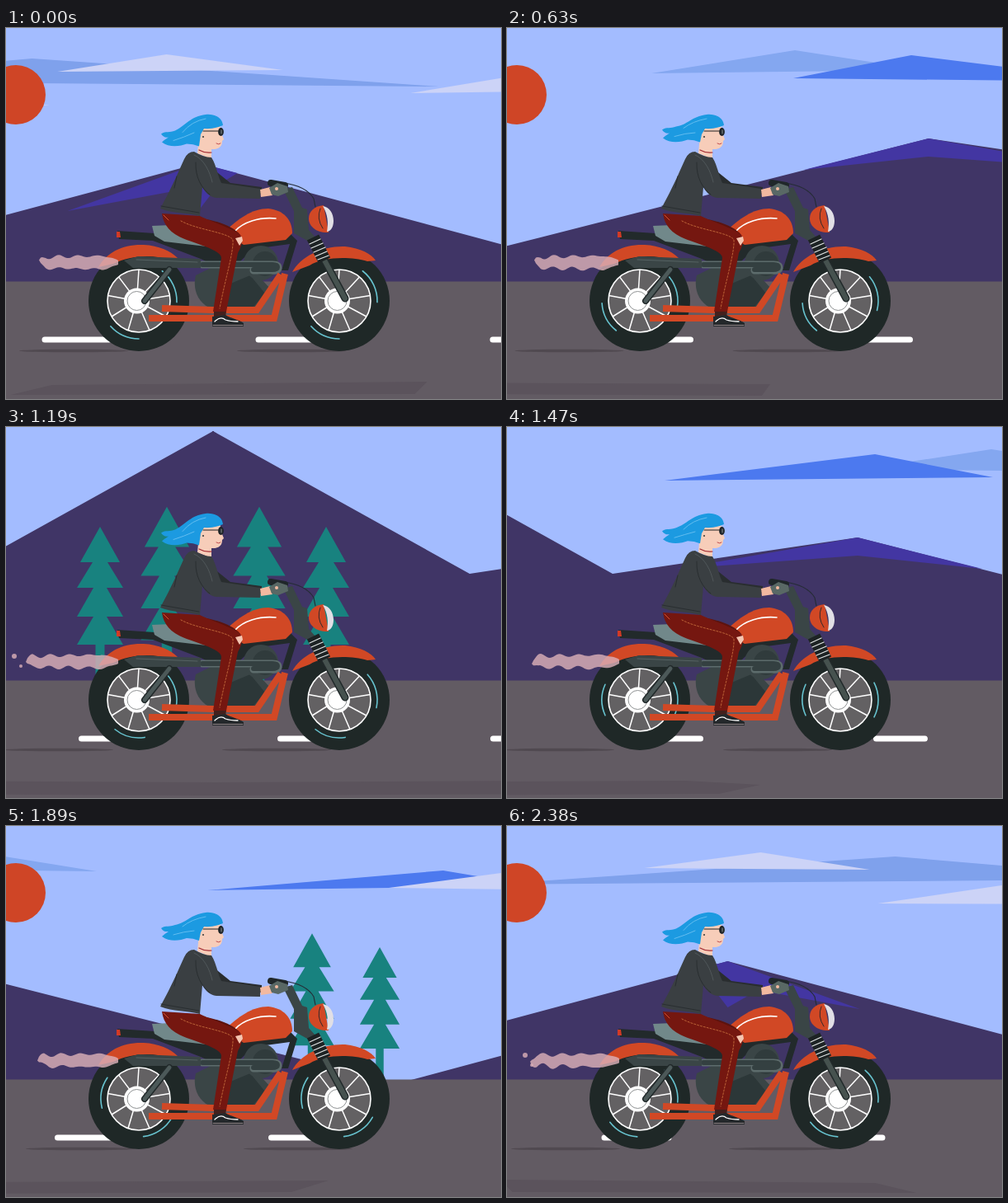
Animation, 600 px wide and 450 px high, one loop 2.45 s. Source, as an HTML page:

```html
<!DOCTYPE html>
<html lang="en">
<head>
<meta charset="utf-8">
<title>Motorbike ride</title>
<style>
  html, body { margin: 0; width: 100%; height: 100%; overflow: hidden; background: #a3bcff; }
  svg { display: block; width: 600px; height: 450px; }
  .line { fill: none; stroke-linecap: round; stroke-linejoin: round; }
  .orange { fill: #d14825; }
  .dark { fill: #222a2b; }
  .grey { fill: #3a4546; }
  .skin { fill: #f7cdb9; }
  .jacket { fill: #3a3f42; }
</style>
</head>
<body>
<svg viewBox="0 0 600 450">
  <defs>
    <g id="tree" fill="#18827f">
      <path d="M0-186 24-143H9L28-112H8L28-77H8L28-43H5.5V1H-5.5V-43H-28L-8-77H-28L-8-112H-28L-9-143H-24Z"/>
    </g>
    <!-- right half of the landscape, x counted from the big peak -->
    <g id="half">
      <path fill="#84a7f0" d="M640 47 770 27 944 55 700 52Z"/>
      <path fill="#4c79ef" d="M374 65 629 33 772 61Z"/>
      <path fill="#4c79ef" d="M1078 78 1364 54 1460 70 1300 75Z"/>
      <path fill="#7fa1ec" d="M1570 71 2064 37 2193 48 2420 66 2190 66Z"/>
      <g fill="#ccd3f7">
        <path d="M1298 75 1456 54 1605 79Z"/>
        <path d="M1760 51 1901 32 2033 53Z"/>
        <path d="M2043 94 2193 72 2330 95Z"/>
      </g>
      <path fill="#403566" d="M-1 308V5H0L311 178 608 134 1290 308H1325L1861 164 2400 308Z"/>
      <path fill="#4336a2" d="M389 172 608 134 759 172 608 156Z"/>
      <path fill="#4336a2" d="M1861 164 2021 222 1898 199 1861 220 1838 190 1815 176Z"/>
      <use href="#tree" transform="translate(56 307) scale(1.13)"/>
      <use href="#tree" transform="translate(137 307)"/>
      <use href="#tree" transform="translate(1205 307) scale(.95)"/>
      <use href="#tree" transform="translate(1287 307) scale(.86)"/>
    </g>
    <g id="lane">
      <g fill="#5b535c">
        <path d="M-1 431 400 429 490 434 440 445-1 447Z"/>
        <path d="M800 432 1225 430 1180 444 810 446Z"/>
        <path d="M1585 429 2040 433 2090 445 1600 444Z"/>
      </g>
      <path class="line" stroke="#fff" stroke-width="7" d="M81.500 378h78M339.500 378h78M630.500 378h59M896.500 378h78M1155.500 378h78M1446.500 378h59M1711.500 378h78M1970.500 378h78"/>
    </g>
    <g id="wheel">
      <circle r="61" fill="#1f2827"/>
      <circle r="38" fill="#636163" stroke="#fff" stroke-width="1.600"/>
      <path id="spokes" stroke="#fff" stroke-width="1.500"/>
      <g transform="translate(-2.500 0)">
        <circle r="15.500" fill="#fff"/>
        <circle r="11.500" fill="#fff" stroke="#8f9293" stroke-width="1"/>
      </g>
      <g class="line" stroke="#67c3cf" stroke-width="1.600">
        <path id="arcA"/>
        <path id="arcB"/>
      </g>
    </g>
  </defs>

  <rect width="600" height="450" fill="#a3bcff"/>
  <g id="hills"><use href="#half"/><use href="#half" transform="scale(-1 1)"/></g>
  <circle id="sun" cx="12" cy="81" r="36" fill="#cf4526"/>
  <rect y="307.500" width="600" height="143" fill="#625b63"/>
  <g id="road"><use href="#lane"/><use href="#lane" transform="scale(-1 1)"/></g>
  <g id="shadow" fill="#504950">
    <ellipse cx="-198" cy="391.500" rx="66" ry="1.800"/>
    <ellipse cx="66" cy="391.500" rx="66" ry="1.800"/>
  </g>

  <!-- bike -->
  <use href="#wheel" x="161" y="331"/>
  <use href="#wheel" x="404" y="331"/>
  <path class="orange" d="M112 290C122 272 142 262 167 263 185 264 199 270 208 279L200 282C178 274 151 276 130 286Z"/>
  <path class="orange" d="M347 296C357 277 384 264 411 265 430 267 443 274 448 282L438 283C418 277 385 277 368 288Z"/>
  <path class="dark" d="M135 246 180 249 232 262 262 263 345 250 353 258 342 294 334 294 344 262 300 268 270 296 236 280 178 258 137 256Z"/>
  <path d="M134 247h4l1 7h-5z" fill="#d23a25"/>
  <path fill="#71888a" d="M177 240 200 239 260 262 243 265 192 259 180 252Z"/>
  <path class="grey" d="M230 300 248 291 296 290 322 318 306 338 246 339C232 332 226 316 230 300Z"/>
  <path fill="#2c3738" d="M258 316 296 300 314 322 300 338H255Z"/>
  <circle class="grey" cx="309" cy="285" r="21"/>
  <circle fill="#303b3c" cx="314" cy="286" r="15"/>
  <path class="line" stroke="#5d6c6c" stroke-width="9" d="M238 287H323q7 0 7 4t-8 3H300"/>
  <path class="line" stroke="#344041" stroke-width="6" d="M238 287H323q6 0 6 3t-7 3H300"/>
  <path class="grey" d="M143 282 160 277 236 280V291L154 291Z"/>
  <path class="line" stroke="#566363" d="M158 281 232 284"/>
  <path class="line" stroke="#222a2b" stroke-width="8" d="M168 331 198 293"/>
  <path class="line" stroke="#4c5959" stroke-width="5" d="M168 331 198 293"/>
  <path class="line" style="stroke-linecap:butt;stroke-linejoin:miter" stroke="#d14825" stroke-width="8" d="M189 340 250 342H304L333 299M173 352H325L338 298"/>
  <path class="orange" d="M264 248C282 231 298 219 318 219 337 221 347 233 347 249L339 257 288 263Z"/>
  <path class="line" stroke="#fff" stroke-width="1.600" d="M278 246C287 236 306 229 327 231"/>

  <!-- fork and headlight -->
  <path class="line" stroke="#222a2b" stroke-width="9" d="M384 278 411 328"/>
  <path class="line" stroke="#46524f" stroke-width="6" d="M384 278 411 328"/>
  <path class="grey" d="M336 196 347 193 359 218 365 220 367 245 375 254 367 259 349 249 349 222Z"/>
  <path class="line" stroke="#1d2324" stroke-width="16" style="stroke-linecap:butt" d="M372 254 386 282"/>
  <path class="line" stroke="#dfe3e3" stroke-width="1.300" d="M368 262 381 256M370 267 384 261M373 272 387 266M375 277 389 271M378 281 391 276"/>
  <path class="line" stroke="#252c36" stroke-width="1.200" d="M336 188C352 190 366 195 373 207L375 217"/>
  <path class="orange" d="M385 215C373 216 367 223 367 231 367 241 377 249 391 248Z"/>
  <path fill="#e1dfe5" d="M384 216C392 217 397 225 397 234 397 242 393 247 389 247 391 236 390 226 384 216Z"/>
  <path class="line" stroke="#33292b" d="M381 219Q376 231 384 243"/>

  <path id="smoke" fill="#d9afb7" fill-opacity=".82"/>
  <g id="puffs" fill="#d9afb7" fill-opacity=".82">
    <circle cy="278" r="3"/><circle cx="8" cy="290" r="2"/>
  </g>

  <!-- rider -->
  <path fill="#292d2f" d="M247 168 272 188 310 193V202L262 198Z"/>
  <path fill="#5c130e" d="M215 229C246 230 273 238 284 251L260 268 222 248Z"/>
  <path fill="#751710" d="M189 225 235 228C246 234 275 243 284 251 289 259 284 267 281 273L267 344H251L261 279C261 271 242 265 219 257 200 250 191 240 189 225Z"/>
  <path class="line" stroke="#c9713f" stroke-width=".9" stroke-dasharray="2 2" d="M212 234C232 245 270 248 275 257 276 272 266 303 259 340"/>
  <path fill="#f5c6b1" d="M278 255 286 253 287 258 283 264Z"/>
  <path class="line" stroke="#d6502f" d="M191 227 197 233"/>
  <path fill="#44201d" d="M252 344H267L266 350H252Z"/>
  <path fill="#24282b" d="M250 350 266 348C272 352 283 354 288 358V362H250Z"/>
  <path class="line" stroke="#fff" stroke-width="1.300" d="M253 356Q260 349 266 354 272 356 281 356"/>
  <path class="line" stroke="#8e8285" d="M251 360.500H287"/>
  <path class="skin" d="M235 120 259 116 262 130 264 135 262 137C262 145 257 147 249 147L249 159 232 152Z"/>
  <path class="jacket" d="M228 150C235 154 242 157 249 157 255 166 256 178 261 188L308 195V207L255 206C247 205 242 200 238 193L235 228C220 224 202 225 187 219L197 200C205 184 211 170 216 159Q220 150 228 150Z"/>
  <path class="line" stroke="#292e30" d="M230 163C229 180 237 195 247 202M207 180 204 194M188 216 234 224"/>
  <path class="line" stroke="#565d60" stroke-width=".8" d="M228 154C240 159 247 174 250 187"/>
  <path fill="#f2b9a0" d="M308 196 320 193 323 203 309 205Z"/>
  <path class="line" stroke="#20272a" stroke-width="8" d="M321 188 338 191"/>
  <path fill="#596865" d="M319 194 329 188 341 192 342 199 330 204 322 202Z"/>
  <circle cx="328" cy="195" r="2" fill="#f2b9a0"/>
  <path class="line" stroke="#a32c34" stroke-width="1.200" d="M234 148Q241 152 249 151"/>
  <path class="line" stroke="#c24c4d" d="M255 140Q258 142 260 140"/>
  <path id="hair" fill="#1c9ae1"/>
  <path id="strands" class="line" stroke="#63bdf0" stroke-width="1"/>
  <path class="line" stroke="#222" d="M239 125H258"/>
  <ellipse cx="260.500" cy="126" rx="3.400" ry="5" fill="#202528"/>
  <path class="line" stroke="#8d9696" d="M261 124V128"/>
  <circle cx="239" cy="132" r="1" fill="#333"/>
</svg>
<script>
const $ = id => document.getElementById(id);
const STEP = 70, LOOP = 2450, SPEED = 108.5;
const stops = [0, 5, 13, 17, 21, 27, 34];

// linear value between the stops
function track(values, n) {
  let i = 0;
  while (i < stops.length - 2 && n > stops[i + 1]) i++;
  const k = (n - stops[i]) / (stops[i + 1] - stops[i]);
  return values[i] + (values[i + 1] - values[i]) * k;
}

function polar(r, deg) {
  const a = deg * Math.PI / 180;
  return (r * Math.cos(a)).toFixed(2) + ' ' + (r * Math.sin(a)).toFixed(2);
}

const arc = (mid, half) => `M${polar(46, mid - half)}A46 46 0 0 1 ${polar(46, mid + half)}`;

let spokes = '';
for (let a = -90; a < 270; a += 40) spokes += `M-2.5 0L${polar(38, a)}`;
$('spokes').setAttribute('d', spokes);

function drawSmoke(n) {
  const left = track([40, 38, 28, 24, 30, 38, 28], n);
  const top = [], bottom = [];
  for (let x = left; x <= 136; x += 2) {
    const k = (x - left) / (136 - left);
    const end = Math.min(1, Math.sqrt((x - left) / 8), Math.sqrt((138 - x) / 22));
    const mid = 284.5 + 3 * (1 - k) * Math.sin(x / 3.7 + n * .9);
    const half = end * (6.5 + 2 * k);
    top.push(`${x} ${mid - half}`);
    bottom.unshift(`${x} ${mid + half + end * Math.sin(x / 4.4 - n * .7)}`);
  }
  $('smoke').setAttribute('d', 'M' + top.concat(bottom).join('L') + 'Z');
  $('puffs').setAttribute('transform', `translate(${left - 6 - (28 - left) * 2} 0)`);
  $('puffs').setAttribute('visibility', left < 29 ? 'visible' : 'hidden');
}

function drawHair(n) {
  const d = Math.cos(2 * Math.PI * n / 17) * 2.5;
  const y = v => (v + d).toFixed(1);
  $('hair').setAttribute('d',
    `M263 118C262 108 252 104 242 105C224 107 218 118 205 ${y(122)}` +
    `C198 ${y(125)} 194 ${y(122)} 188 ${y(126)}Q191 ${y(131)} 197 ${y(130)}` +
    `Q192 ${y(133)} 189 ${y(136)}C198 ${y(143)} 211 ${y(141)} 219 ${y(138)}` +
    `Q227 ${y(138)} 234 ${y(141)}L236 129L240 122Q252 123 263 118Z`);
  $('strands').setAttribute('d',
    `M242 110Q225 113 214 ${y(124)}M228 127Q216 ${y(130)} 203 ${y(134)}`);
}

function draw(n) {
  const move = `translate(${251 + (17 - n) * SPEED} 0)`;
  $('hills').setAttribute('transform', move);
  $('road').setAttribute('transform', move);
  $('sun').setAttribute('visibility', n > 15 && n < 24 ? 'hidden' : 'visible');
  $('shadow').setAttribute('transform',
    `translate(${track([280, 275, 272, 262, 262, 288, 269], n)} 0)`);
  $('arcA').setAttribute('d', arc(track([-25, 0, -25, -15, 0, 56, -22], n), 27));
  $('arcB').setAttribute('d', arc(track([114, 180, 125, 105, 180, 190, 118], n), 24));
  drawSmoke(n);
  drawHair(n);
}

let last = -1;
function tick() {
  const n = Math.floor(performance.now() % LOOP / STEP);
  if (n !== last) draw(last = n);
  requestAnimationFrame(tick);
}
tick();
</script>
</body>
</html>
```
